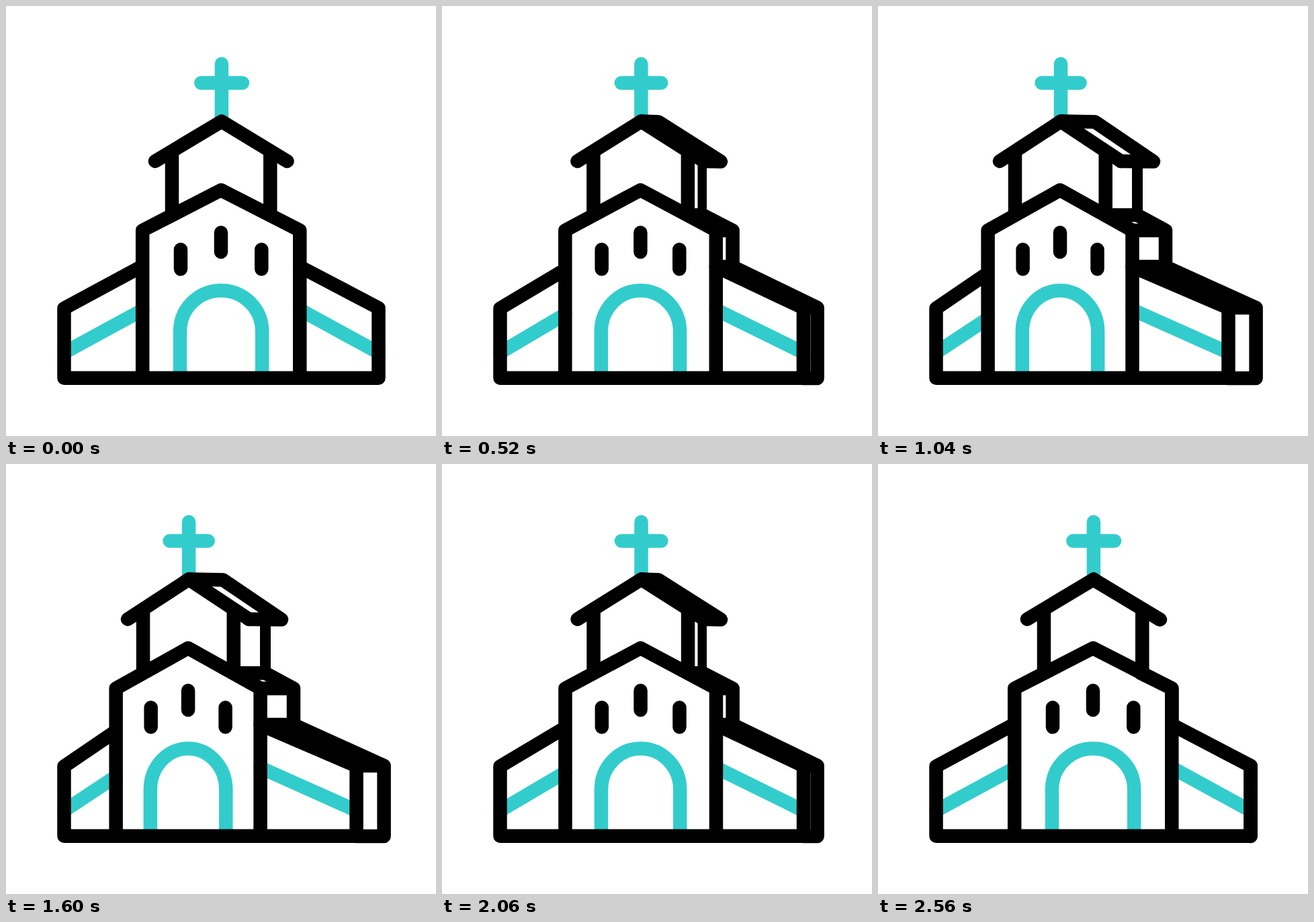
Recreate the animation shown at these times as an HTML page. Size 640x640 px, loop 3.6 s.

```html
<!DOCTYPE html>
<html lang="en">
<head>
<meta charset="utf-8">
<title>Turning church</title>
<style>
  html, body { margin: 0; width: 100%; height: 100%; overflow: hidden; background: #fff; }
  svg { display: block; width: 100%; height: 100%; }
  path { fill: none; stroke-width: 20.5; stroke-linecap: round; stroke-linejoin: round; }
</style>
</head>
<body>
<svg viewBox="0 0 640 640">
  <path id="accent" stroke="#33cccc"/>
  <path id="side" stroke="#000"/>
  <path id="post" style="fill: #000; stroke: none"/>
  <path id="front" stroke="#000"/>
</svg>
<script>
const LOOP = 3600, TURN = 1040, TURN_BACK = 1540;
const draw = (id, d) => document.getElementById(id).setAttribute('d', d);

function ease(x) {
  x = Math.min(1, Math.max(0, x));
  return x * x * x * (x * (6 * x - 15) + 10);
}

// p runs from 0 (seen from the front) to 1 (turned, side visible)
function render(p, showSide) {
  const mix = (a, b) => a + (b - a) * p;
  const baseY = 553.7, wallY = 334, wingY = 449.5, eaveY = 231;

  const spire = mix(320.9, 272), spireBack = mix(321, 323);
  const eaveL = mix(222, 181), eaveR = mix(418.5, 361.5), eaveBack = mix(420, 410);
  const towerL = mix(247, 204), towerR = mix(393.3, 338.7), towerBack = mix(391, 386);
  const gable = mix(320, 271), wallL = mix(203.2, 163.6);
  const wallR = mix(437.3, 378.5), wallBack = mix(437.3, 428);
  const wingL = 86.5, wingR = mix(554.5, 521.5), wingBack = mix(554.7, 562.6);
  const doorL = mix(259, 214.8), doorR = mix(381.2, 327.2), doorRadius = (doorR - doorL) / 2;

  draw('accent', `
    M${spire} 86.3V168 M${mix(290.3, 243.6)} 114.6H${mix(352, 300.6)}
    M${doorL} ${baseY}V484.5A${doorRadius} 61 0 0 1 ${doorR} 484.5V${baseY}
    M${wingL} 516L${wallL} ${mix(452.5, 465)} M${wallR} 452L${wingR} 516`);

  draw('side', showSide ? `
    M${spire} 171.5L${spireBack} 172.5L${eaveBack} 231.5L${eaveR} ${eaveY}
    M${towerR} 311.3H${towerBack}L${wallBack} ${wallY}H${wallR}
    M${wallBack} ${wallY}V388H${wallR}
    M${wallBack} 388L${wingBack} 449H${wingR}
    M${wingBack} 449L${wingBack} 554H${wingR}` : '');

  draw('post', showSide ? `M${mix(383, 378)} 226H394V311H${mix(383, 378)}Z` : '');

  draw('front', `
    M${eaveL} ${eaveY}L${spire} 171.7L${eaveR} ${eaveY}
    M${towerL} 219V309 M${towerR} 219V309
    M${wallL} ${baseY}V${wallY}L${gable} 274L${wallR} ${wallY}V${baseY}
    M${wallL} ${mix(387, 397.5)}L${wingL} 450V${baseY}H${wingR}V${wingY}L${wallR} 388
    M${mix(260, 215.6)} 362.6V391.6
    M${gable} 337.2V366
    M${mix(380.3, 326.5)} 362.6V391.6`);
}

function frame() {
  const t = performance.now() % LOOP;
  render(ease(t / TURN) - ease((t - TURN_BACK) / TURN), t >= 20);
  requestAnimationFrame(frame);
}
frame();
</script>
</body>
</html>
```
